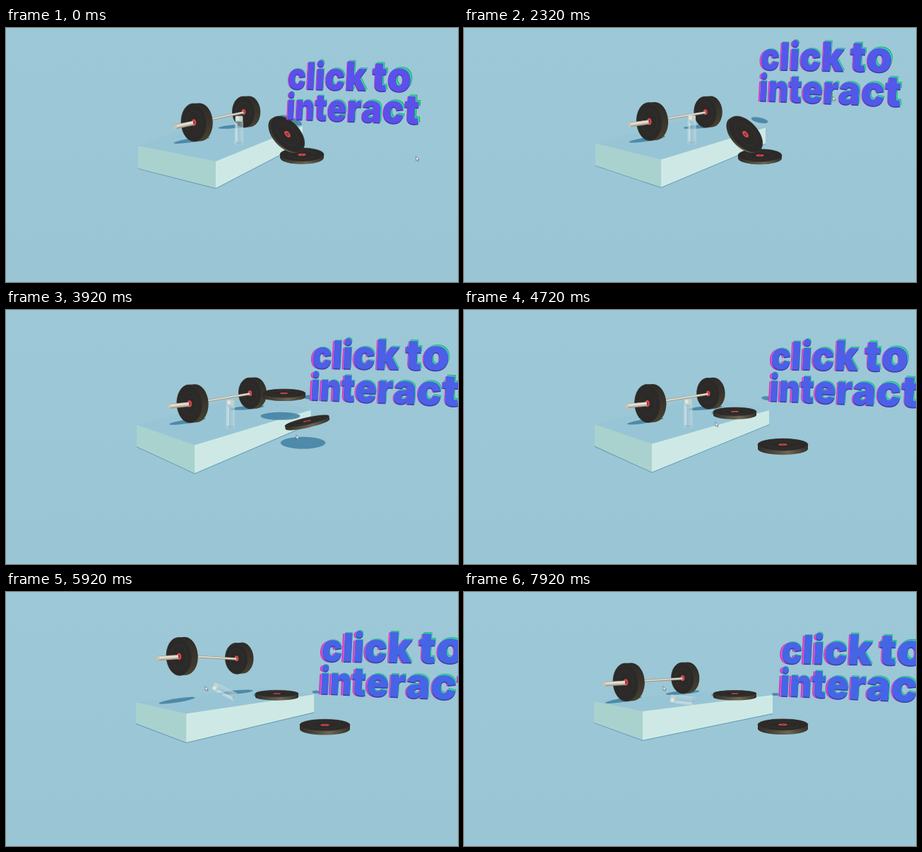
Recreate the animation shown at these times as an HTML page. Size 640 px wide and 360 px high, loop 8 s.

```html
<!DOCTYPE html>
<html lang="en">
<head>
<meta charset="utf-8">
<title>Click to interact</title>
<style>
  html, body { margin: 0; width: 100%; height: 100%; overflow: hidden; background: #9bc6d6; }
  svg { display: block; width: 100vw; height: 100vh; }
  text { font: 900 100px Inter, "Open Sans", sans-serif; }
</style>
</head>
<body>
<svg id="stage" viewBox="0 0 640 360">
  <defs>
    <linearGradient id="sky" x2="0" y2="1">
      <stop offset="0" stop-color="#9dc8d7"/>
      <stop offset="1" stop-color="#99c5d5"/>
    </linearGradient>
    <linearGradient id="rim">
      <stop offset="0" stop-color="#2f2c27"/>
      <stop offset=".6" stop-color="#6e6653"/>
      <stop offset="1" stop-color="#35312a"/>
    </linearGradient>
    <linearGradient id="tread" x2="0" y2="1">
      <stop offset="0" stop-color="#2c2a27"/>
      <stop offset="1" stop-color="#48412f"/>
    </linearGradient>
    <linearGradient id="glass">
      <stop offset="0" stop-color="#dcebee" stop-opacity=".6"/>
      <stop offset=".4" stop-color="#a3c5d1" stop-opacity=".5"/>
      <stop offset="1" stop-color="#c4dbe1" stop-opacity=".65"/>
    </linearGradient>
  </defs>
  <rect width="640" height="360" fill="url(#sky)"/>
</svg>
<script>
const NS = 'http://www.w3.org/2000/svg';
const stage = document.getElementById('stage');
const LOOP = 8000, STEP = 80;

function set(el, attrs) {
  for (const k in attrs) el.setAttribute(k, attrs[k]);
}
function add(tag, attrs, parent = stage) {
  const el = document.createElementNS(NS, tag);
  set(el, attrs);
  return parent.appendChild(el);
}

const mix = (a, b, k) => a + (b - a) * k;
const ramp = (t, from, to) => Math.min(1, Math.max(0, (t - from) / (to - from)));
const ease = k => k * k * (3 - 2 * k);
const arc = k => 4 * k * (1 - k); // ballistic height over one hop
const points = list => list.map(p => p.map(n => n.toFixed(2)).join()).join(' ');

// Scene, back to front
const shade = () => add('ellipse', { fill: '#4482a3', opacity: .88 });
function putShade(el, cx, cy, rx, ry, turn = 0) {
  set(el, { cx, cy, rx, ry, transform: `rotate(${turn} ${cx} ${cy})` });
}
const slabShadow = add('polyline', { fill: 'none', stroke: '#6298b2', 'stroke-width': 1.8 });
const slabTop = add('polygon', { fill: '#98c5d5' });
const textShade = shade();
const slabLeft = add('polygon', { fill: '#a9d2cf' });
const slabRight = add('polygon', { fill: '#cee9e5' });
const [nearShade, farShade, shadeB, shadeA] = [shade(), shade(), shade(), shade()];

function makeDisc(rim) {
  return {
    side: add('path', { fill: rim }),
    face: add('ellipse', { fill: '#2b2a28', stroke: '#3b3833', 'stroke-width': .7 }),
    ring: add('ellipse', { fill: 'none', stroke: '#363431', 'stroke-width': .8 }),
    hub: add('ellipse', { fill: '#df4850' }),
    core: add('ellipse', { fill: '#8e3438' })
  };
}
// (dx, dy) is the thickness: the hull of two equal ellipses makes the side
function putDisc(d, cx, cy, rx, ry, turn, dx, dy) {
  const r = turn * Math.PI / 180, c = Math.cos(r), s = Math.sin(r);
  const a = Math.atan2((dy * c - dx * s) / ry, (dx * c + dy * s) / rx);
  const rimPoint = (w, k) => {
    const x = rx * Math.cos(w), y = ry * Math.sin(w);
    return `${(cx + k * dx + x * c - y * s).toFixed(2)} ${(cy + k * dy + x * s + y * c).toFixed(2)}`;
  };
  const q = Math.PI / 2, half = `A${rx} ${ry} ${turn} 0 1 `;
  set(d.side, { d: `M${rimPoint(a + q, 0)}${half}${rimPoint(a - q, 0)}L${rimPoint(a - q, 1)}${half}${rimPoint(a + q, 1)}Z` });
  const scales = { face: 1, ring: .62, hub: .18, core: .08 };
  for (const k in scales)
    set(d[k], { cx, cy, rx: rx * scales[k], ry: ry * scales[k], transform: `rotate(${turn} ${cx} ${cy})` });
}
const rod = (color, width) => add('line', { stroke: color, 'stroke-width': width });
const putRod = (el, x1, y1, x2, y2) => set(el, { x1, y1, x2, y2 });

const farDisc = makeDisc('url(#tread)');
const shaft = [rod('#9c9384', 3.4), rod('#e2dbcd', 1.9)];
const nearDisc = makeDisc('url(#tread)');
const sleeve = [rod('#a39a88', 6.4), rod('#d0c8ba', 4.4), rod('#ebe6dc', 1.6)];
const sleeveEnd = add('ellipse', { rx: 1.8, ry: 3.2, fill: '#cfc3a8' });

const flask = add('g', {});
add('rect', { x: -6, y: -34, width: 12, height: 34, rx: 2, fill: 'url(#glass)' }, flask);
add('rect', { x: -3.8, y: -31, width: 1.4, height: 27, fill: '#eef5f6', opacity: .55 }, flask);
add('rect', { x: -5, y: -4, width: 10, height: 3, rx: 1, fill: '#8fb4c4', opacity: .5 }, flask);
add('rect', { x: -5.4, y: -41, width: 10.8, height: 8, rx: 1.5, fill: '#c4d1cc' }, flask);
add('rect', { x: -4.4, y: -40.2, width: 4.6, height: 5.4, rx: 1, fill: '#dfe7e2' }, flask);

const discB = makeDisc('url(#rim)');
const discA = makeDisc('url(#rim)');

// Lettering: each glyph sits on a plane seen in perspective
const pen = document.createElement('canvas').getContext('2d');
pen.font = '900 100px Inter, "Open Sans", sans-serif';
const layers = [
  { fill: '#1fa878', green: 1 }, { fill: '#2fe3a0', green: .6 },
  { fill: '#c43dc0', pink: 1 }, { fill: '#e65ac6', pink: .5 },
  { fill: '#3b3da6', drop: 1.5 }, { fill: '#5b50ea' }
];
for (const layer of layers) layer.group = add('g', { fill: layer.fill });
const face = layers[layers.length - 1].group;

function makeLine(words, from, to) {
  let total = 0;
  const glyphs = [];
  for (const ch of words) {
    const width = ch === ' ' ? 15 : pen.measureText(ch).width;
    if (ch !== ' ') {
      const copies = layers.map(layer => {
        const el = add('text', {}, layer.group);
        el.textContent = ch;
        return el;
      });
      glyphs.push({ start: total, width, copies });
    }
    total += width;
  }
  return { glyphs, total, from, to };
}
// left x, baseline, right x, baseline, left size, right size: first and last view
const lines = [
  makeLine('click to', [400, 86, 572, 90, 51, 60], [450, 101, 651, 104, 54, 64]),
  makeLine('interact', [398, 129, 583, 136, 50, 58], [448, 147, 666, 157, 53, 64])
];

function drawLine(line, turn, lift) {
  const [xl, yl, xr, yr, sl, sr] = line.from.map((v, i) => mix(v, line.to[i], turn));
  const left = xl - 1.5, span = xr - xl + 3, slope = (yr - yl) / span, ratio = sr / sl;
  const pink = mix(1.6, 3.6, turn), green = mix(2.4, 1, turn);
  const depth = u => ratio - (ratio - 1) * u;
  for (const g of line.glyphs) {
    const u1 = g.start / line.total, u2 = (g.start + g.width) / line.total, u = (u1 + u2) / 2;
    const f1 = u1 / depth(u1), f2 = u2 / depth(u2);
    const sx = (f2 - f1) * span / g.width, sy = sl * ratio / depth(u) / 100;
    layers.forEach((layer, i) => {
      const p = layer.pink || 0, n = layer.green || 0;
      const x = left + f1 * span - p * pink * (1 - .6 * u) + n * (.4 + green * u);
      const y = yl + f1 * span * slope + lift + p - n * (.6 + 1.6 * u) + (layer.drop || 0);
      const m = [sx, sx * slope, -.05 * sy, sy, x, y].map(v => v.toFixed(4));
      set(g.copies[i], { transform: `matrix(${m})` });
    });
  }
}

const arrow = add('path', {
  d: 'M0 0V6L1.5 4.8L2.6 7L3.6 6.5L2.6 4.5H4.4Z', fill: '#f6f8fa', stroke: '#46545e', 'stroke-width': .6
});
const glides = [
  { from: 320, to: 1200, x: 522, y: 97 },
  { from: 2400, to: 3440, x: 411, y: 177 },
  { from: 4400, to: 5200, x: 273.5, y: 131.5 },
  { from: 5440, to: 5800, x: 282, y: 133.5 }
];

function drawSlab(view, tilt) {
  const lx = view(187, 184), ly = view(167, 155) + 4 * tilt, lh = view(32, 30);
  const fx = view(297, 253), fy = view(189, 169) + 16 * tilt, fh = view(38, 41);
  const rx = view(420, 437), ry = view(139, 146) - 2 * tilt, rh = view(24, 26) - 6 * tilt;
  const bottom = [[lx, ly + lh], [fx, fy + fh], [rx, ry + rh]];
  set(slabTop, { points: points([[lx, ly], [fx, fy], [rx, ry], [lx + rx - fx - 3, ly + ry - fy + 7]]) });
  set(slabLeft, { points: points([[lx, ly], [fx, fy], bottom[1], bottom[0]]) });
  set(slabRight, { points: points([[fx, fy], [rx, ry], bottom[2], bottom[1]]) });
  set(slabShadow, { points: points(bottom) });
}

function drawBarbell(t, view, tilt) {
  const k = ramp(t, 5240, 6060), hop = arc(k);
  const roll = 15 * k + 13.5 * ramp(t, 6060, LOOP);
  const nx = view(266, 257) - roll, nearGround = view(134, 128) + 3 * tilt;
  const fx = view(336.5, 349.5) - roll - 12 * k, farGround = view(119, 122) - 3 * tilt;
  const ny = nearGround - 66 * hop, fy = farGround - 48 * hop;
  const ex = nx - view(26, 30), ey = ny + view(6, 2.5);

  putShade(nearShade, nx - 3, nearGround + 25, 26, 2.8, -9);
  putShade(farShade, fx - view(12, 0), farGround + 20.5, 24, 2.6, -5);
  putDisc(farDisc, fx, fy, 16, 22, -3, 8, -.6);
  putDisc(nearDisc, nx, ny, 18, 27, -3, 9, -.6);
  shaft.forEach((el, i) => putRod(el, nx + 6, ny - 1, fx, fy + .8 - i * .4));
  sleeve.forEach((el, i) => putRod(el, ex, ey - i * .6, nx - 1, ny + .8 - i * .6));
  set(sleeveEnd, { cx: ex, cy: ey });
}

function drawPlates(t, view, tilt) {
  const b = ramp(t, 3600, 4480), bHop = arc(b), slide = b ** 1.5;
  const bx = mix(419, 451.5, slide), bGround = mix(179.5, 188, slide) + 3 * tilt;
  putShade(shadeB, bx - 6 * bHop, bGround + 4, mix(31, 34, slide), 8.5);
  putDisc(discB, bx, bGround - 29 * bHop, mix(31, 35.5, slide), view(9.5, 8) - 4 * bHop, -14 * bHop, bHop, mix(4, 6, slide));

  // leans at first, flies up flat, then tips over once more
  const a = ramp(t, 3600, 4560), tip = arc(ramp(t, 5200, 5800));
  const lean = Math.max(1 - ease(ramp(t, 3600, 3920)), Math.min(1, 1.25 * tip));
  const ax = mix(398.5, 383.5, a), aGround = mix(150.5, 144, a);
  putShade(shadeA, ax - 5, aGround + 2, 28 - 10 * lean, 5.5);
  putDisc(discA, ax - 3 * tip, aGround - 34 * arc(a) - 31 * tip, 30.5, mix(4.5 + 1.5 * tilt, 17.5, lean),
    lean * mix(48, 68, a), -3 * lean, mix(5, 1, lean));
}

function drawFlask(t, view, tilt) {
  const k = ramp(t, 5240, 6060);
  const x = view(330, 312) + 15 * k, y = view(165.5, 155) + 10 * tilt - 14 * arc(k);
  set(flask, { transform: `translate(${x} ${y}) rotate(${-83 * k ** 1.5}) scale(1 ${mix(1, .85, k)})` });
}

function draw(t) {
  const swing = ramp(t, 1360, 2960), settle = ramp(t, 4600, 6160);
  const turn = .68 * swing + .32 * settle;
  const tilt = swing * swing * (1 - settle);
  const view = (first, last) => mix(first, last, turn);

  drawSlab(view, tilt);
  putShade(textShade, view(403, 441), view(131, 145) - 17 * tilt, view(17, 5), view(5, 2), view(20, 0));
  drawBarbell(t, view, tilt);
  drawFlask(t, view, tilt);
  drawPlates(t, view, tilt);

  const lift = -14 * tilt - 46 * arc(ramp(t, 2100, 3260));
  for (const line of lines) drawLine(line, turn, lift);
  face.setAttribute('fill', `rgb(${[view(92, 68), view(80, 102), view(234, 230)].map(Math.round)})`);

  let px = 580.5, py = 182;
  for (const g of glides) {
    const k = ramp(t, g.from, g.to);
    px = mix(px, g.x, k);
    py = mix(py, g.y, k);
  }
  set(arrow, { transform: `translate(${px} ${py})` });
}

const began = performance.now();
function tick() {
  const t = Math.max(0, performance.now() - began) % LOOP;
  draw(Math.floor(t / STEP) * STEP);
  requestAnimationFrame(tick);
}
tick();
</script>
</body>
</html>
```
